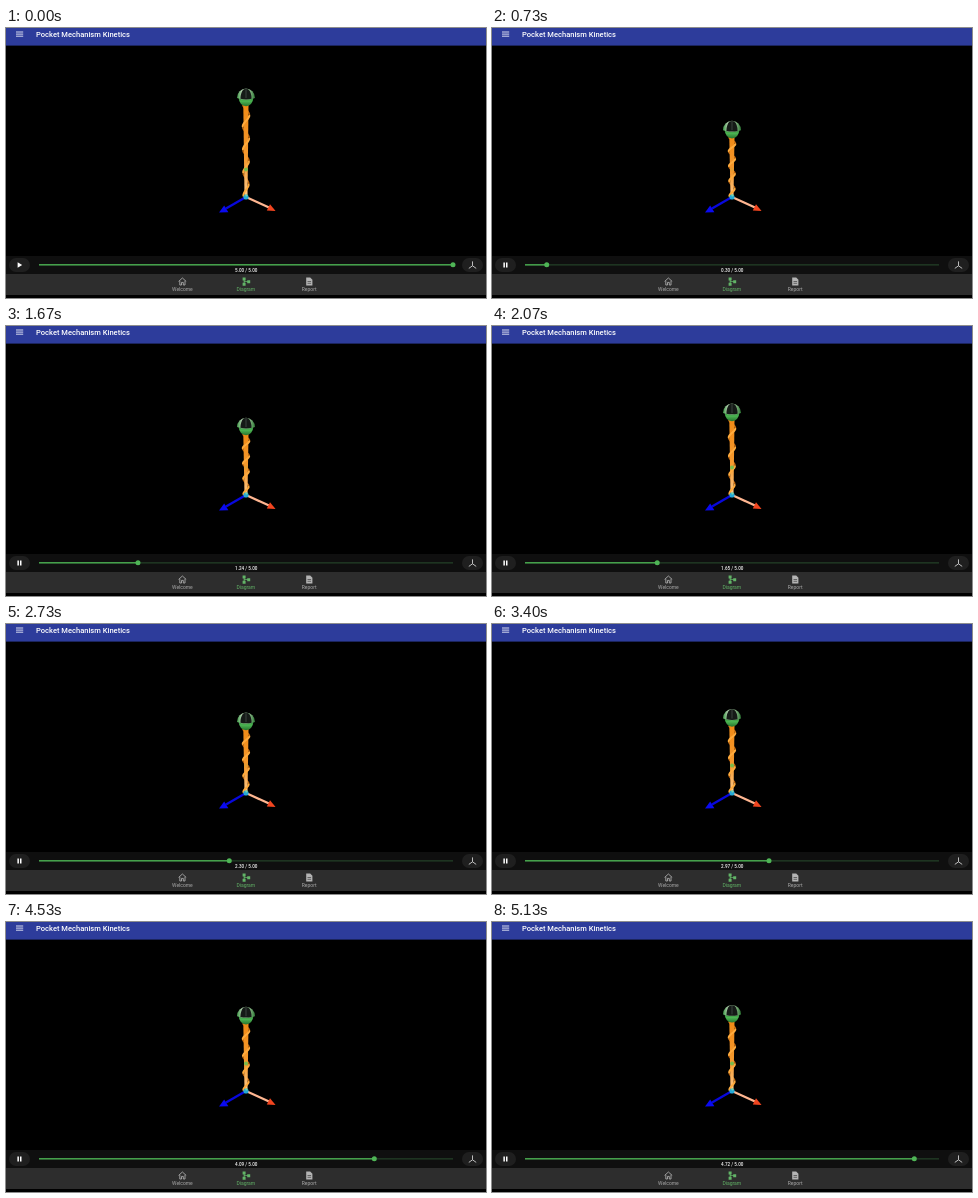
Animation of 480x270 px, one loop 5.19 s. Source, as an HTML page:

```html
<!DOCTYPE html>
<html lang="en">
<head>
<meta charset="utf-8">
<title>Spring simulation</title>
<style>
  html, body { margin: 0; width: 100%; height: 100%; overflow: hidden; background: #000; }
  svg { display: block; width: 100vw; height: 100vh; }
  text { font-family: Roboto, "Open Sans", sans-serif; }
  .nav { font-size: 5px; text-anchor: middle; fill: #a9a9a9; }
  .nav.on { fill: #62b467; }
</style>
</head>
<body>
<svg viewBox="0 0 480 270">
  <defs>
    <linearGradient id="rodFill" x1="0" x2="0" y1="0" y2="1">
      <stop offset="0" stop-color="#f08a16"/>
      <stop offset=".6" stop-color="#f59a30"/>
      <stop offset="1" stop-color="#ffca8c"/>
    </linearGradient>
    <linearGradient id="domeFill" x1="0" x2="1" y1="0" y2="0">
      <stop offset="0" stop-color="#3f9a48"/>
      <stop offset=".25" stop-color="#a9c9a6"/>
      <stop offset=".75" stop-color="#7fae7d"/>
      <stop offset="1" stop-color="#2c7a34"/>
    </linearGradient>
    <linearGradient id="bowlFill" x1="0" x2="0" y1="0" y2="1">
      <stop offset="0" stop-color="#2a7d32"/>
      <stop offset=".45" stop-color="#4cb553"/>
      <stop offset="1" stop-color="#27752e"/>
    </linearGradient>
  </defs>

  <rect width="480" height="270"/>

  <!-- header -->
  <rect width="480" height="17.6" fill="#2d3c9b"/>
  <path d="M10 4h7.2M10 6.1h7.2M10 8.2h7.2" stroke="#e8eaf6" stroke-width=".9"/>
  <text x="30" y="8.9" font-size="7.55" font-weight="500" fill="#fff">Pocket Mechanism Kinetics</text>

  <!-- scene -->
  <path id="back" fill="none" stroke="#b9620c" stroke-width="1.7"/>
  <path id="rod" fill="url(#rodFill)"/>
  <path id="front" fill="none" stroke="#ffab3d" stroke-width="2" stroke-linecap="round"/>
  <circle id="joint" cx="240" cy="141.5" r="2" fill="#6cc04f"/>
  <path d="M240 169L220 180.5" stroke="#0808dc" stroke-width="2.4"/>
  <path d="M213 184.4L218.2 177.6L222.4 184.2Z" fill="#0a0af0"/>
  <path d="M240 169L263 179.6" stroke="#ffb691" stroke-width="2.2"/>
  <path d="M269.6 183L260.8 182.6L264 176.2Z" fill="#f2451f"/>
  <circle cx="240" cy="169" r="2.6" fill="#25a9d6"/>
  <circle cx="240.4" cy="167.4" r="1.1" fill="#7fd6a0"/>
  <g id="ball">
    <path d="M-7.6 0Q-6.6 8.6 0 9.2Q6.6 8.6 7.6 0Z" fill="url(#bowlFill)"/>
    <path d="M-9 1A9 9.4 0 0 1 9 1Q0 4.4 -9 1Z" fill="url(#domeFill)"/>
    <path d="M-5.6 1.8Q-5.4 -5 -2.4 -7.6Q0 -8.8 2.4 -7.6Q5.4 -5 5.6 1.8Q0 3 -5.6 1.8Z" fill="#151a17"/>
    <path d="M0 -7.8V1" stroke="#4c5750" stroke-width=".7"/>
  </g>

  <!-- player -->
  <rect y="228" width="480" height="18" fill="#0f0f0f"/>
  <rect x="3" y="230" width="21" height="14" rx="7" fill="#1f1f1f"/>
  <rect x="456" y="230" width="21" height="14" rx="7" fill="#1f1f1f"/>
  <path id="play" d="M11.6 234.3L16.2 237L11.6 239.7Z" fill="#fff"/>
  <path id="pause" d="M11.4 234.5h1.5v5h-1.5zM14 234.5h1.5v5h-1.5z" fill="#fff"/>
  <path d="M466.5 233.4V237.8L462.8 240.4M466.5 237.8L470.2 240.4" fill="none" stroke="#d0d0d0" stroke-width=".9"/>
  <path d="M33 236.8H447" stroke="#234127" stroke-width="1.2"/>
  <path id="bar" stroke="#45a04b" stroke-width="1.5"/>
  <circle id="knob" cy="236.8" r="2.5" fill="#4fb556"/>
  <text id="clock" x="240.2" y="243.5" font-size="4.6" font-weight="500" text-anchor="middle" fill="#f2f2f2"></text>

  <!-- navigation -->
  <rect y="246" width="480" height="21" fill="#2d2d2d"/>
  <path d="M172.6 253.4L176.4 250L180.2 253.4M173.8 252.8V257H175.5V254.4H177.3V257H179V252.8" fill="none" stroke="#a9a9a9" stroke-width=".9"/>
  <path d="M236.6 249.6h3v3h-3zM236.6 254.8h3v3h-3zM241.2 252.2h3v3h-3zM237.7 252h.9v3h-.9zM238.5 253.2h3v.9h-3z" fill="#62b467"/>
  <path d="M300.2 249.6H304.2L306.4 251.8V257.6H300.2Z" fill="#b4b4b4"/>
  <path d="M301.5 253.5h3.6M301.5 255.3h3.6" stroke="#2d2d2d" stroke-width=".6"/>
  <text class="nav" x="176.4" y="263.3">Welcome</text>
  <text class="nav on" x="239.8" y="263.3">Diagram</text>
  <text class="nav" x="303.2" y="263.3">Report</text>
</svg>

<script>
const LOOP = 5190, STEP = 1000 / 15, START = 465;
const BASE = 169, REST = 91, DROP = 22, TURNS = 4;

// [wall ms, simulated seconds, knob x]
const MARKS = [
  [470, 0.04, 33], [1270, 0.84, 99], [2070, 1.65, 165.5], [2730, 2.30, 223],
  [3400, 2.97, 277], [4530, 4.09, 368], [5130, 4.72, 422]
];

const $ = id => document.getElementById(id);
const set = (id, attrs) => {
  for (const k in attrs) $(id).setAttribute(k, attrs[k]);
};

function mark(ms, col) {
  let i = 1;
  while (i < MARKS.length - 1 && ms > MARKS[i][0]) i++;
  const a = MARKS[i - 1], b = MARKS[i];
  const u = Math.max(0, (ms - a[0]) / (b[0] - a[0]));
  return a[col] + (b[col] - a[col]) * u;
}

// damped mass on a spring: k/m = 50, c/m = 1
const height = t => REST - DROP * Math.exp(-t / 2) * Math.cos(7.053 * t);

function coil(top, front) {
  const n = 120;
  let d = "", pen = false;
  for (let i = 0; i <= n; i++) {
    const u = i / n, a = 2 * Math.PI * (TURNS * u - 0.44);
    if ((Math.sin(a) > 0) !== front) { pen = false; continue; }
    const x = 240 + (3.5 - 0.9 * u) * Math.cos(a);
    d += (pen ? "L" : "M") + x.toFixed(2) + " " + (top + (BASE - top) * u).toFixed(2);
    pen = true;
  }
  return d;
}

function draw(ms) {
  const on = ms >= START;
  const y = height(on ? (ms - 430) / 1000 : 0);
  const x = on ? mark(ms, 2) : 447;
  const top = y + 8;

  set("ball", { transform: `translate(240 ${y.toFixed(2)})` });
  set("rod", { d: `M237.3 ${top}H242.5L241.5 ${BASE}H238.5Z` });
  set("back", { d: coil(top, false) });
  set("front", { d: coil(top, true) });
  set("joint", { opacity: y < 95.5 ? 0.9 : 0.1 });
  set("play", { opacity: on ? 0 : 1 });
  set("pause", { opacity: on ? 1 : 0 });
  set("bar", { d: `M33 236.8H${x}` });
  set("knob", { cx: x });
  $("clock").textContent = (on ? mark(ms, 1) : 5).toFixed(2) + " / 5.00";
}

const begin = performance.now();
function tick() {
  const ms = (performance.now() - begin) % LOOP;
  draw(Math.floor((ms + 4) / STEP) * STEP);
  requestAnimationFrame(tick);
}
tick();
</script>
</body>
</html>
```
